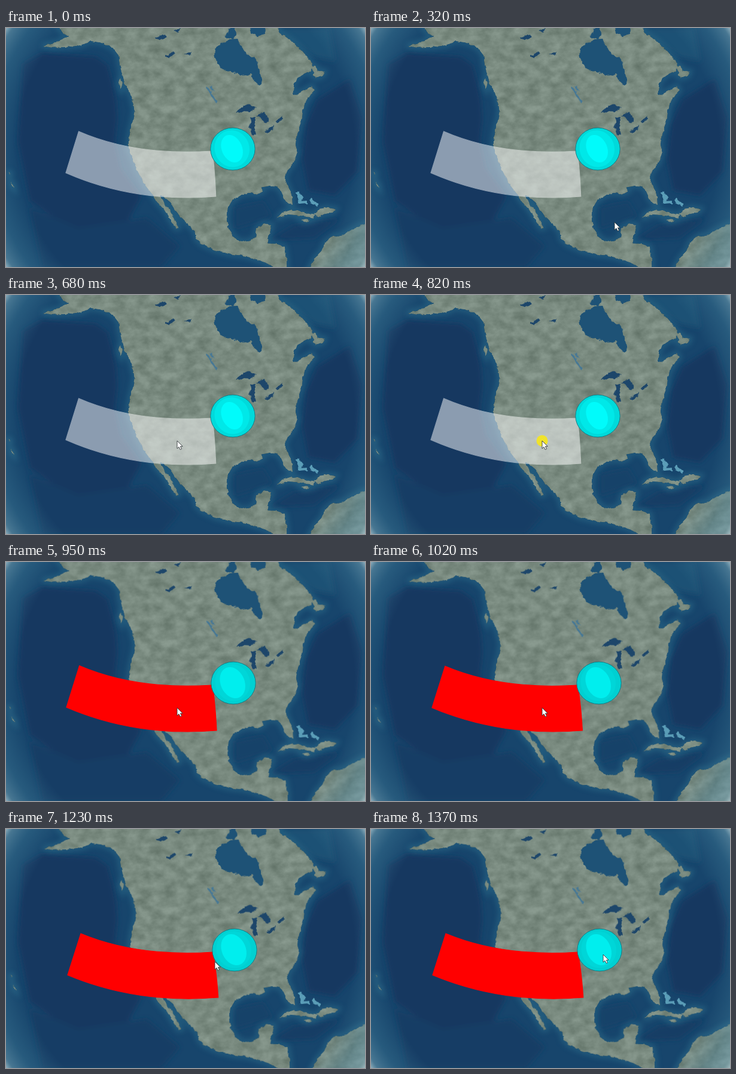
An HTML page that plays this animation: 600x400 px, repeating every 1.44 s.

```html
<!DOCTYPE html>
<html lang="en">
<head>
<meta charset="utf-8">
<title>Globe selection</title>
<style>
html, body { margin: 0; width: 100%; height: 100%; overflow: hidden; background: #17456c; }
svg { display: block; width: 600px; height: 400px; }
</style>
</head>
<body>
<svg viewBox="0 0 600 400">
  <defs>
    <radialGradient id="haze" gradientUnits="userSpaceOnUse" cx="300" cy="200" r="362">
      <stop offset=".78" stop-color="#43809b" stop-opacity="0"/>
      <stop offset=".9" stop-color="#43809b" stop-opacity=".36"/>
      <stop offset=".97" stop-color="#6f9fb1" stop-opacity=".55"/>
      <stop offset="1" stop-color="#b5cdd3" stop-opacity=".85"/>
    </radialGradient>
    <filter id="blur" filterUnits="userSpaceOnUse" x="-60" y="-60" width="720" height="520"><feGaussianBlur stdDeviation="4"/></filter>
    <filter id="soft" filterUnits="userSpaceOnUse" x="-60" y="-60" width="720" height="520"><feGaussianBlur stdDeviation="18"/></filter>
    <filter id="ragged" filterUnits="userSpaceOnUse" x="-20" y="-20" width="640" height="440" color-interpolation-filters="sRGB">
      <feTurbulence type="fractalNoise" baseFrequency=".13" numOctaves="2" seed="4"/>
      <feDisplacementMap in="SourceGraphic" scale="6" xChannelSelector="R" yChannelSelector="G"/>
    </filter>
    <filter id="terrain" filterUnits="userSpaceOnUse" x="-20" y="-20" width="640" height="440" color-interpolation-filters="sRGB">
      <feTurbulence type="fractalNoise" baseFrequency=".13" numOctaves="2" seed="4" result="warp"/>
      <feDisplacementMap in="SourceGraphic" in2="warp" scale="5" xChannelSelector="R" yChannelSelector="G" result="land"/>
      <feTurbulence type="fractalNoise" baseFrequency=".05 .07" numOctaves="5" seed="9"/>
      <feColorMatrix values="1 0 0 0 0  1 0 0 0 0  1 0 0 0 0  0 0 0 0 1" result="relief"/>
      <feComposite in="land" in2="relief" operator="arithmetic" k2="1" k3=".2" k4="-.1"/>
      <feComposite in2="land" operator="in"/>
    </filter>
    <g id="coast">
      <path d="M82-15 92 6 104 14 82 24 61 30 76 33 102 32 126 29 142 22 160 25 178 33 188 46 190 62 194 78 197 92 206 107 212 120 215 135 212 154 208 170 205 188 204 201 211 217 217 234 225 250 233 264 244 278 252 291 264 304 272 317 284 335 289 334 283 321 274 306 264 292 257 281 265 284 275 292 282 304 292 317 303 328 315 340 318 353 327 362 351 373 376 379 396 381 414 386 434 393 450 402 455 420H470L469 385 466 366 452 361 436 360 441 344 444 329 431 327 419 335 417 349 408 356 394 358 382 351 374 339 369 322 371 301 378 289 391 280 406 276 421 278 430 273 426 267 441 264 452 265 459 272 465 285 472 295 479 296 478 280 470 262 466 250 471 239 481 225 487 208 484 195 486 179 491 164 495 152 496 140 500 126 508 114 515 104 511 97 500 103 488 110 479 112 482 93 491 80 504 74 514 67 508 54 494 38 478 22 458 8 448-15Z"/>
      <path d="M509 65 517 64 521 70 533 73 530 80 519 84 512 80 515 74Z"/>
      <path d="M453 319 462 309 477 304 493 307 516 313 513 318 491 314 471 312Z"/>
      <path d="M514 312 524 303 536 300 551 303 546 309 531 312 522 317Z"/>
      <path d="M493 321 502 319 508 323 499 325Z"/>
      <path d="M500 415 517 384 527 373 533 359 545 349 563 346 580 336 595 329 615 325V415Z"/>
      <path d="M3 239 7 244 6 246Z M8 258 12 262 13 268 9 264Z"/>
      <path d="M191 84 195 91 192 103 188 95Z M211 121 221 130 222 138 213 130Z"/>
    </g>
    <clipPath id="coastClip"><use href="#coast"/></clipPath>
  </defs>

  <rect width="600" height="400" fill="#17456c"/>
  <g filter="url(#blur)">
    <path d="M28 60 60 42 150 48 170 62 178 92 184 122 186 152 182 190 192 235 226 282 200 330 120 345 40 290 20 190Z" fill="#143961"/>
    <path d="M520 120 575 85 596 150 588 240 550 280 505 272 495 220 502 160Z" fill="#143961"/>
    <path d="M40 300 120 335 235 318 290 365 260 400H60Z" fill="#153e65"/>
    <path d="M440 355 480 330 560 318 515 352Z" fill="#143c65"/>
    <path d="M382 300 430 290 445 316 410 328 382 336Z" fill="#164269"/>
    <path d="M445 0H540L550 55 515 48 480 25Z" fill="#1d5174"/>
  </g>

  <g id="earth">
    <use href="#coast" fill="none" stroke="#2c6c8a" stroke-width="9" opacity=".55" filter="url(#blur)"/>
    <g filter="url(#terrain)">
      <use href="#coast" fill="#798a7f"/>
      <g clip-path="url(#coastClip)">
        <g filter="url(#soft)">
          <ellipse cx="265" cy="215" rx="62" ry="55" fill="#8f988a"/>
          <ellipse cx="300" cy="300" rx="32" ry="38" fill="#889182"/>
          <ellipse cx="440" cy="220" rx="48" ry="62" fill="#6d8376"/>
          <ellipse cx="320" cy="110" rx="70" ry="38" fill="#809085"/>
          <ellipse cx="240" cy="105" rx="30" ry="55" fill="#718378"/>
          <ellipse cx="450" cy="85" rx="40" ry="55" fill="#788a80"/>
          <ellipse cx="450" cy="380" rx="50" ry="30" fill="#6c816d"/>
        </g>
        <path d="M105 27 150 14 180 23 193 46 205 77 218 106" fill="none" stroke="#aab8b3" stroke-width="12" opacity=".65" filter="url(#blur)"/>
      </g>
    </g>
    <g fill="#1d466a" filter="url(#ragged)">
      <path fill="#1e5276" d="M350 33 360 26 373 20 387 19 394 32 402 44 417 51 421 60 424 73 428 89 424 98 415 89 409 77 394 79 375 73 358 67 349 50Z"/>
      <path fill="#1e5276" d="M367 16 372 3 380-4 385 8 381 20Z M407-5 432-5 433 10 420 14 410 8Z"/>
      <path d="M384 143 392 133 405 127 418 134 409 140 396 139Z"/>
      <path d="M409 151 418 148 415 164 418 180 411 178 407 164Z"/>
      <path d="M419 147 430 140 440 151 436 161 426 152Z"/>
      <path d="M432 173 447 163 446 170 437 175Z M449 158 462 147 463 152 453 159Z"/>
      <path d="M250 17 262 11 269 15 257 20Z M266 47 279 40 283 44 270 50Z M298 43 310 38 307 46Z M280 4 292 0 289 8Z"/>
    </g>
    <path d="M335 99 341 106 347 118 353 123M341 97 346 105" fill="none" stroke="#477895" stroke-width="3" filter="url(#ragged)"/>
    <path d="M486 275 493 284 490 292 503 291M508 287 520 297" fill="none" stroke="#67adc5" stroke-width="6" opacity=".85" filter="url(#ragged)"/>
  </g>

  <rect width="600" height="400" fill="url(#haze)"/>
  <path id="area" stroke-width="1.2"/>

  <g id="ball">
    <ellipse id="shell" rx="37.2" ry="35.4" stroke="#127f87"/>
    <ellipse id="glow" cx="-1" cy="-1" rx="29" ry="31" transform="rotate(-20)"/>
    <ellipse id="core" cx="-1" cy="-1" transform="rotate(-24)"/>
  </g>

  <circle id="click" cx="286" cy="244" r="9.5" fill="#f4e51f" opacity=".92"/>
  <path id="cursor" d="M0 0V13L3 10.3 5.2 14.8 7.5 13.7 5.4 9.3H9.2Z" fill="#fff" stroke="#33383b" stroke-width=".9"/>
</svg>

<script>
const LOOP = 1440;
const CLICK = 820, SELECT = 950;
const $ = id => document.getElementById(id);

// [start time, tip x, tip y]
const cursorStops = [
  [250, 450, 353], [320, 407, 325], [390, 350, 288], [460, 306, 259],
  [530, 288.5, 247], [610, 287, 245], [680, 286, 244], [1090, 292, 241],
  [1160, 310, 234], [1230, 349, 222], [1300, 380, 212], [1370, 388, 210]
];

const show = (el, visible) => el.setAttribute('visibility', visible ? 'visible' : 'hidden');

function setAttributes(id, attributes) {
  for (const [name, value] of Object.entries(attributes)) $(id).setAttribute(name, value);
}

function areaPath(turn) {
  const drift = (x, y, dx, dy = 0) => `${x + dx * turn} ${y + dy * turn}`;
  return `M${drift(121.5, 173, 3.5, 2)}Q${drift(217, 214.5, 3)} ${drift(345, 206, 1)}` +
    `Q${drift(349, 240, 3)} ${drift(350.7, 282, 4)}` +
    `Q${drift(215, 293, 4)} ${drift(100, 242.5, 3, 2)}Z`;
}

function draw(time) {
  const t = time % LOOP;
  const selected = t >= SELECT;
  const turn = selected ? Math.min(3, Math.floor((t - SELECT) / 70) + 1) / 3 : 0;
  const areaColor = selected ? '#f00' : '#fff';

  setAttributes('earth', { transform: `translate(${3.2 * turn}) rotate(${-0.5 * turn} 350 200)` });
  setAttributes('area', { d: areaPath(turn), fill: areaColor, stroke: areaColor, opacity: selected ? 1 : 0.5 });

  setAttributes('ball', { transform: `translate(${379 + 3 * turn} 202.5)` });
  setAttributes('shell', { fill: selected ? '#00d0d2' : '#00dadb' });
  setAttributes('glow', { fill: selected ? '#00d6d8' : '#00e8e8' });
  setAttributes('core', selected
    ? { fill: '#00eeee', rx: 20, ry: 27 }
    : { fill: '#00fbfb', rx: 17, ry: 24 });

  show($('click'), t >= CLICK && t < SELECT);
  const stop = cursorStops.findLast(([start]) => start <= t);
  show($('cursor'), stop);
  if (stop) setAttributes('cursor', { transform: `translate(${stop[1]} ${stop[2]})` });
}

function tick(now) {
  draw(now);
  requestAnimationFrame(tick);
}
draw(0);
requestAnimationFrame(tick);
</script>
</body>
</html>
```
